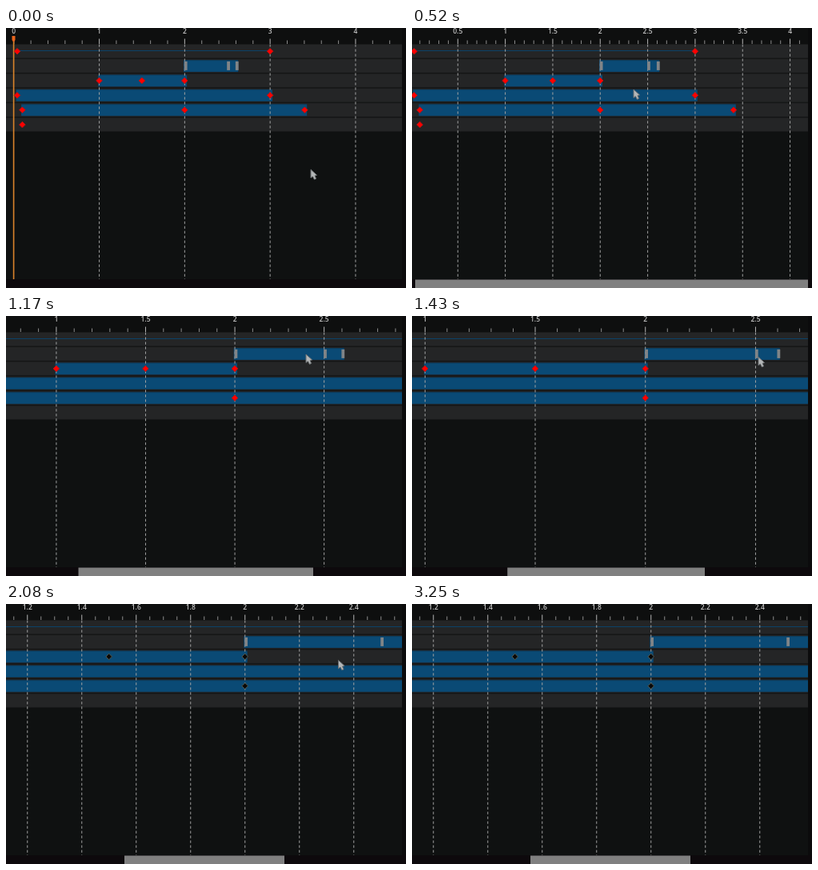
An HTML page with a canvas for the animation above (4680 ms loop, 500 by 326 pixels).

```html
<!DOCTYPE html>
<html>
<head>
<meta charset="utf-8">
<style>
html, body { margin: 0; height: 100%; overflow: hidden; background: #0f1111; }
canvas { display: block; }
</style>
</head>
<body>
<canvas id="stage" width="500" height="326"></canvas>
<script>
const ctx = document.getElementById('stage').getContext('2d');
const STEP = 130, LOOP = 4680, RIGHT = 495, BOTTOM = 315;

// Zoom clicks reached at each step; every click scales by the same factor.
const clicks = [0, 0, 0, 0, 1, 1, 2, 3, 5, 7, 8, 9, 10, 11];
const scaleAt = n => 106.8 * Math.pow(340 / 106.8, n / 11);

// [clicks, x of time zero, scrollbar left, scrollbar right]
const views = [[0, 9.5, 0, 495], [1, -2.3, 4, 495], [3, -31.3, 25.5, 447],
               [7, -160.5, 90.5, 384], [11, -381.5, 148, 348]];
// [step, x, y]
const pointer = [[0, 381, 177.5], [4, 277, 77], [7, 372, 43], [9, 375, 48],
                 [13, 491, 55], [19, 340, 86], [21, 340, 86]];

const tracks = [
  { line: [0.04, 3], keys: [0.04, 3] },
  { bar: [2, 2.6], grips: [2, 2.5, 2.6] },
  { bar: [1, 2], keys: [1, 1.5, 2] },
  { bar: [0.04, 3], keys: [0.04, 3] },
  { bar: [0.1, 3.405], keys: [0.1, 2, 3.405] },
  { keys: [0.1] }
];
const rowMid = i => 29 + i * 18.4;

function rect(x, y, w, h, color) {
  ctx.fillStyle = color;
  ctx.fillRect(x, y, w, h);
}

function shape(points, fill, stroke) {
  ctx.beginPath();
  points.forEach(([x, y]) => ctx.lineTo(x, y));
  ctx.closePath();
  ctx.fillStyle = fill;
  ctx.fill();
  if (stroke) {
    ctx.strokeStyle = stroke;
    ctx.lineWidth = 1;
    ctx.stroke();
  }
}

function sample(list, at, ease = v => v) {
  let i = 0;
  while (i < list.length - 2 && list[i + 1][0] <= at) i++;
  const a = list[i], b = list[i + 1];
  const lo = ease(a[0]), k = Math.min(1, (ease(at) - lo) / (ease(b[0]) - lo));
  return a.map((v, j) => v + (b[j] - v) * k);
}

function drawRuler(toX, scale) {
  const [major, minor] = scale < 112 ? [1, 0.2] : scale < 285 ? [0.5, 0.1] : [0.2, 0.05];
  const per = Math.round(major / minor);
  ctx.font = '600 8.5px "Open Sans", "Noto Sans", sans-serif';
  ctx.textAlign = 'center';
  for (let i = 0; toX(i * minor) < RIGHT; i++) {
    const t = i * minor, x = toX(t) - 0.25, isMajor = i % per === 0;
    if (x < -10) continue;
    rect(x, isMajor ? 13.5 : 15.5, 1, isMajor ? 6.5 : 4.5, isMajor ? '#b4b4b4' : '#8c8c8c');
    if (!isMajor) continue;
    ctx.fillStyle = '#c4c4c4';
    ctx.fillText(String(+t.toFixed(2)), x + 0.5, 6.5);
    if (i === 0) continue;
    for (let y = 20.5; y < BOTTOM; y += 6) rect(x, y, 1, 3.2, '#a2a3a3');
  }
}

function drawTracks(toX) {
  tracks.forEach(({ line, bar }, i) => {
    const y = rowMid(i);
    rect(0, y - 8.3, RIGHT, 16.8, '#242526');
    if (line) rect(toX(line[0]), y - 1, toX(line[1]) - toX(line[0]), 1, '#0b4268');
    if (bar) {
      const x = Math.max(-5, toX(bar[0]) - 1);
      const w = Math.min(RIGHT, toX(bar[1]) + 3) - x;
      rect(x, y - 7.3, w, 15, '#0a3d60');
      rect(x, y - 6.3, w, 13.6, '#0a4a75');
    }
  });
}

function drawMarks(toX, step) {
  const fill = step < 13 ? '#f00' : step < 16 ? '#c40000' : '#080808';
  const edge = step < 13 ? '#b41414' : step < 16 ? '#7c1a1a' : '#55574a';
  tracks.forEach(({ keys = [], grips = [] }, i) => {
    const y = rowMid(i);
    grips.forEach(t => {
      if (toX(t) < RIGHT) rect(toX(t) - 0.3, y - 5.5, 3.8, 11, '#808487');
    });
    keys.forEach(t => {
      const x = toX(t) + 0.2, r = 3.8, cy = y + 0.2;
      if (x < RIGHT) shape([[x, cy - r], [x + r, cy], [x, cy + r], [x - r, cy]], fill, edge);
    });
  });
}

function drawPointer(step) {
  if (step > 21) return;
  const [, x, y] = sample(pointer, step);
  if (step < 18) {
    const arrow = [[0, 0], [0, 10.5], [2.4, 8.6], [4.4, 12.4], [6.6, 11.4], [5, 7.8], [7.6, 7]];
    shape(arrow.map(([dx, dy]) => [x + dx, y + dy]), '#b4b7b8', '#6a6e70');
    return;
  }
  rect(x - 5, y - 0.8, 10, 1.6, '#a9b4ba');
  for (const side of [-1, 1])
    shape([[x + side * 7.5, y], [x + side * 4, y - 3], [x + side * 4, y + 3]], '#a9b4ba');
}

function draw(step) {
  const n = clicks[Math.min(step, clicks.length - 1)], scale = scaleAt(n);
  const [, origin] = sample(views, n, scaleAt);
  const [, , left, right] = sample(views, n);
  const toX = t => origin + t * scale;

  rect(0, 0, 500, 326, '#0f1111');
  rect(0, 0, 500, 20, '#0e0f0f');
  rect(0, 20, RIGHT, 110, '#151616');
  drawTracks(toX);
  drawRuler(toX, scale);
  rect(RIGHT, 0, 5, 326, '#0b0b0c');
  rect(0, BOTTOM, 500, 11, '#0d090c');
  if (n) rect(left, 315.5, right - left, 10.5, '#808080');
  if (origin > 0) {
    rect(origin - 0.7, 10, 1.6, BOTTOM - 10, '#d9832b');
    shape([[origin - 2, 10], [origin + 2, 10], [origin + 2, 15], [origin, 18], [origin - 2, 15]], '#e8641c');
  }
  drawMarks(toX, step);
  drawPointer(step);
}

function tick(now) {
  draw(Math.floor(now % LOOP / STEP));
  requestAnimationFrame(tick);
}
draw(0);
requestAnimationFrame(tick);
</script>
</body>
</html>
```
